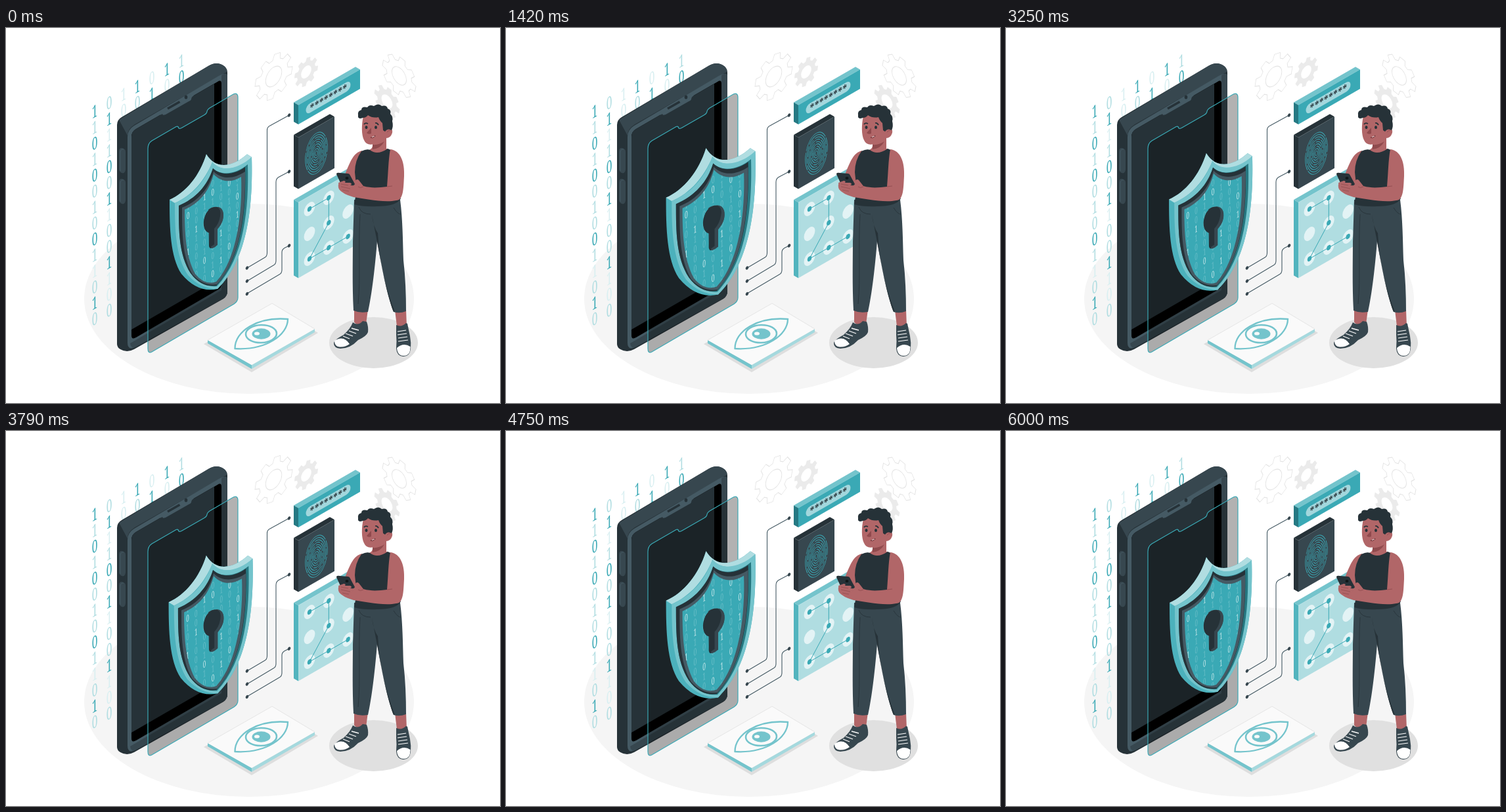
Animation of 752 by 572 pixels, one loop 6040 ms. Source, as an HTML page with a canvas:

```html
<!DOCTYPE html>
<html lang="en">
<head>
<meta charset="utf-8">
<title>Mobile security</title>
<style>
html, body { margin: 0; width: 752px; height: 572px; overflow: hidden; background: #fff; }
canvas { display: block; }
</style>
</head>
<body>
<canvas id="stage" width="752" height="572"></canvas>
<script>
const LOOP = 6040;
const stage = document.getElementById('stage');
const backdrop = document.createElement('canvas');
backdrop.width = 752;
backdrop.height = 572;
let ctx = backdrop.getContext('2d');

const TEAL = '#3aa9b5', MID = '#74c4cc', PALE = '#b0dde1';
const INK = '#263238', SLATE = '#37474f', STEEL = '#455a64', SKIN = '#b16668', SHADE = '#8f4a4d';
const ISO = 0.577;

function fill(color, d) {
  ctx.fillStyle = color;
  ctx.fill(new Path2D(d));
}

function line(color, d, width = 1) {
  ctx.strokeStyle = color;
  ctx.lineWidth = width;
  ctx.stroke(new Path2D(d));
}

function oval(color, x, y, rx, ry, tilt = 0) {
  ctx.fillStyle = color;
  ctx.beginPath();
  ctx.ellipse(x, y, rx, ry, tilt, 0, Math.PI * 2);
  ctx.fill();
}

function ring(color, x, y, rx, ry, width, tilt = 0) {
  ctx.strokeStyle = color;
  ctx.lineWidth = width;
  ctx.beginPath();
  ctx.ellipse(x, y, rx, ry, tilt, 0, Math.PI * 2);
  ctx.stroke();
}

// Runs a drawing on an upright isometric plane; dir 1 rises to the right.
function onPlane(x, y, sx, draw, dir = 1) {
  ctx.save();
  ctx.transform(sx, -sx * ISO * dir, 0, 1, x, y);
  draw();
  ctx.restore();
}

function glyph(ch, x, y, size, color, sx = 0.6, weight = '') {
  onPlane(x, y, sx, () => {
    ctx.font = `${weight} ${size}px "Noto Serif", serif`;
    ctx.textAlign = 'center';
    ctx.fillStyle = color;
    ctx.fillText(ch, 0, size * 0.357);
  });
}

function gear(x, y, r, dir, solid) {
  onPlane(x, y, 0.866, () => {
    const p = new Path2D();
    const teeth = 8;
    for (let i = 0; i < teeth; i++) {
      [[-0.34, 0.76], [-0.2, 1], [0.2, 1], [0.34, 0.76]].forEach(([a, k]) => {
        const turn = (i + a) / teeth * Math.PI * 2 + 0.2;
        p.lineTo(Math.cos(turn) * r * k, Math.sin(turn) * r * k);
      });
    }
    p.closePath();
    p.moveTo(r * 0.43, 0);
    p.arc(0, 0, r * 0.43, 0, Math.PI * 2);
    if (solid) {
      ctx.fillStyle = '#ebebeb';
      ctx.fill(p, 'evenodd');
    } else {
      ctx.strokeStyle = '#e3e3e3';
      ctx.lineWidth = 1;
      ctx.stroke(p);
    }
  }, dir);
}

// Letters a, b, c give the strength of each digit.
function digitColumn(x, y, digits, tones) {
  const colors = { a: TEAL, b: '#b0dde1', c: '#d8eff1' };
  [...digits].forEach((ch, i) => glyph(ch, x, y + i * 24.35, 26, colors[tones[i]]));
}

function drawFloor() {
  ctx.fillStyle = '#fff';
  ctx.fillRect(0, 0, 752, 572);
  oval('#f5f5f5', 370, 413, 251, 145);
  oval('#e0e0e0', 559.5, 480, 67.5, 39);
  gear(407.5, 74, 33, 1, false);
  gear(457, 67, 21, 1, true);
  gear(598.5, 73, 29.5, -1, false);
  gear(580, 112, 22.5, -1, true);
  digitColumn(135, 127, '11010010011010', 'abababbbabcbab');
  digitColumn(157, 114, '01110011001100', 'bacbabacbbaccb');
  digitColumn(179, 101, '10', 'cc');
  digitColumn(200, 89, '10', 'ab');
  digitColumn(222, 76, '01', 'ca');
  digitColumn(245, 63, '10', 'ac');
  digitColumn(267, 50, '10', 'ba');
}

function drawPhone() {
  fill(INK, 'M169 148Q169 140 176 136L308 58Q321 50 332 58Q337 62 337 68V402Q337 409 331 413L195 490Q184 496 174 490Q169 487 169 482Z');
  fill(SLATE, 'M172 140L308 58Q321 50 332 58Q337 62 336 67L196 147Q185 154 185 164Z');
  fill(STEEL, 'M185 166Q185 155 195 149L324 73Q337 66 337 74V402Q337 408 331 412L196 487Q185 492 185 480Z');
  fill(SLATE, 'M328 72Q337 67 337 75V402Q337 408 331 412L196 487Q190 489 189 481L328 400Z');
  fill('#000', 'M191 166Q191 158 198 154L322 82Q328 78 328 85V391Q328 396 323 399L198 472Q191 476 191 469Z');
  fill(INK, 'M191 166Q191 158 198 154L317 85V387L191 460Z');
  fill(STEEL, 'M235 133L238 126L283 100L286 103Q282 105 282 109Q281 111 278 112L243 132Q238 134 238 131Z');
  line(INK, 'M246 123L264.500 112.500', 3.5);
  oval(INK, 274, 105.500, 2.300, 3);
  for (const y of [202, 249]) {
    fill(SLATE, `M172 ${y - 15}Q173 ${y - 21} 179 ${y - 18}Q182 ${y - 17} 182 ${y - 13}V${y + 14}Q181 ${y + 21} 176 ${y + 19}Q172 ${y + 17} 172 ${y + 13}Z`);
    line(STEEL, `M174 ${y + 16}V${y - 13}Q175 ${y - 18} 179 ${y - 17}`, 1);
  }
  const glass = 'M216 184Q216 176 222 172L259 150.500Q262 149 263 153Q265 154 268 152L302 132.500Q306 130 306 127Q307 124 310 122L346 101Q353 98 353 106V411Q353 417 347 421L222 494Q216 497 216 489Z';
  fill('rgba(0,0,0,.3)', glass);
  line(TEAL, glass, 1.2);
}

function drawWires() {
  line(STEEL, 'M431 133L402 149Q397.500 151 397.500 156V343Q397.500 348 394 350L367 366', 1.1);
  line(STEEL, 'M431 219L415 227.500Q411 230 411 235V355Q411 360 407 362L367 386', 1.1);
  line(STEEL, 'M431 332L424 335.500Q420 338 420 342V369Q420 374 416 376L367 405', 1.1);
  for (const y of [133, 219, 332]) oval(SLATE, 431, y, 2, 2.8, 0.5);
  for (const y of [366, 386, 405.5]) oval(SLATE, 367, y, 2, 2.8, 0.5);
}

// Upright slab with its front face at x = 445.
function slab(top, width, height, front, side, lid) {
  const rise = width * ISO;
  fill(lid, `M438 ${top - 4}l${width} ${-rise}l7 4l${-width} ${rise}Z`);
  fill(side, `M438 ${top - 4}l7 4v${height}l-7 -4Z`);
  fill(front, `M445 ${top}l${width} ${-rise}v${height}l${-width} ${rise}Z`);
}

function drawCards() {
  slab(117.5, 94, 29.5, TEAL, '#267983', MID);
  ctx.lineCap = 'round';
  onPlane(490.5, 106, 0.866, () => line('#a3d7dd', 'M-32 0H32', 14.5));
  ctx.lineCap = 'butt';
  for (let i = 0; i < 8; i++) glyph('*', 466 + i * 7.1, 121.5 - i * 4.1, 16, INK, 0.8, 'bold');

  slab(167, 55, 78.5, SLATE, INK, INK);
  onPlane(472.5, 191, 0.866, () => {
    for (let i = 1; i <= 9; i++) {
      ctx.setLineDash(i < 3 ? [] : [13 + i * 4, 2, 10 + i * 2, 2.5]);
      ctx.lineDashOffset = i * 17;
      ring(TEAL, 0, 0, i * 2.15, i * 3.4, 0.9);
    }
    ctx.setLineDash([]);
  });

  slab(266, 94, 115.5, PALE, '#52b4be', MID);
  const spots = [];
  for (let c = 0; c < 3; c++) {
    for (let r = 0; r < 3; r++) {
      const x = 462 + c * 29.3, y = 276 - c * 17 + r * 38;
      spots.push([x, y]);
      onPlane(x, y, 0.866, () => oval('#e3f3f5', 0, 0, 9.7, 9.7));
    }
  }
  const route = [0, 3, 4, 6 - 0, 5, 8].map(i => spots[i]);
  route[3] = spots[2];
  line(TEAL, 'M' + route.map(p => p.join(' ')).join('L'), 1);
  for (const [x, y] of route) onPlane(x, y, 0.866, () => oval(TEAL, 0, 0, 3.7, 3.7));

  fill('#dedede', 'M301 482L405 423L475 465L374 525Z');
  fill(MID, 'M307 476L374 514V520L307 481Z');
  fill('#a5d9de', 'M374 514L470 459V464L374 520Z');
  fill('#fafafa', 'M307 476L405 420L470 459L374 514Z');
  line('#e0e0e0', 'M307 476L405 420L470 459', 0.8);
  line(MID, 'M348.500 489C348 463 382 440 429 444C429 468 396 492 348.500 489Z', 2.3);
  ring(MID, 388.5, 466.5, 23.5, 13.5, 2.6, -0.03);
  oval(MID, 388.5, 466.5, 14, 8.2);
  oval('#fafafa', 382, 466, 4, 2.6);
}

function drawPerson() {
  fill(SKIN, 'M530 429H551L548 452Q538 456 530 449ZM592 430H609L610 455Q602 460 595 455Z');
  fill(SLATE, 'M528 449Q536 455 543 447L549 448Q552 456 551 464Q549 470 536 476Q524 489 509 489Q499 488 499 481Q499 476 514 468Q524 459 528 449Z');
  fill('#fff', 'M500 477Q514 468 523 482Q516 487 508 486.500Q500 486 500 477Z');
  line('#fff', 'M513 470L523 474M517 466L528 470M522 462L533 466M526 458L537 461', 1.3);
  fill(SLATE, 'M594 453Q602 457 609 450L611 451L615 470Q617 480 616 490Q614 502 604 501Q595 500 594 489Q595 478 594 468Z');
  fill('#fff', 'M595 488Q605 479 615.500 486Q616 500 605 500Q596 500 595 488Z');
  line('#fff', 'M596 463L609 461M596 468L610 466M597 473L611 471M597 478L612 476', 1.2);

  fill(SLATE, 'M530 262H600C604 292 604 325 605 354C608 380 609 407 609 432Q599 436 590 433C580 407 572 365 565 325C562 362 557 407 551 433Q538 435 529 431C527 391 528 356 528 326Z');
  fill(INK, 'M565 326L557 285Q559 303 566 313C568 353 577 395 592 433H590C580 407 572 365 565 326Z');
  line(INK, 'M537 273Q541 284 555 284M539 284C536 335 540 380 536 421M590 274Q596 284 601 284', 0.8);

  fill(SKIN, 'M542 187C529 190 524 204 517 221L514 235L530 242L538 218Z');
  fill(SKIN, 'M558 171L579 166L579 184Q586 186 589 189L570 203L543 188Q557 187 558 180Z');
  fill(SHADE, 'M558 178Q567 179 576 173Q570 184 558 185Z');
  fill(INK, 'M541 188Q549 184 554 186Q565 195 581 184L588 187Q580 211 585 242L601 260Q595 272 565 272Q544 273 530 269Q535 248 531 220Q531 202 541 188Z');
  fill(SKIN, 'M585 185C601 187 607 205 606 226C605 245 605 263 594 263C575 267 546 260 529 258Q512 253 507 246Q504 239 508 236L530 236Q533 229 537 232L544 241C558 245 569 243 580 242C582 219 582 201 585 185Z');
  line(SHADE, 'M580 242L588 241M544 242Q539 245 536 242', 0.8);
  fill(INK, 'M503 223Q503 220 508 221L520 222Q523 222 524 225L531 238Q530 241 526 240L515 240Q511 240 509 236Z');
  oval('#101719', 519, 229, 2.5, 2);
  fill(SKIN, 'M506 236L514 233Q518 233 516 236L524 236Q528 238 524 240L528 243Q528 247 523 247L526 252L515 250L507 244Z');
  line(SHADE, 'M510 238L521 240M510 242L524 245M512 247L522 249', 0.7);

  fill(SKIN, 'M544 134C541 148 541 163 545 171Q549 180 560 177Q572 175 577 168Q585 169 588 160Q589 151 581 152L578 134L560 128Z');
  fill(INK, 'M543 137Q535 140 536 133Q535 126 541 125Q541 119 550 121Q553 116 560 119Q567 114 572 119Q580 117 581 123Q587 125 585 131Q590 136 588 142Q590 150 587 156Q581 152 577 158L574 156L573 145Q569 142 567 136Q558 138 551 133Q548 137 543 137Z');
  oval(INK, 548.5, 151.5, 2, 2.5);
  oval(INK, 563, 151.5, 2, 2.5);
  line(INK, 'M545 147Q547 144 551 146M562 145Q565 144 567 148', 1.7);
  fill(SHADE, 'M556 152L549 160Q552 163 556 161Z');
  line('#6e3034', 'M555 167Q559 168 562 164', 1.3);
  line('#fff', 'M557 166.500L561 165', 0.8);
  line(SHADE, 'M580 159Q582 156 585 156', 0.8);
}

const FACE = 'M272 277C294 267 309 250 316 223C328 236 344 236 358 227C360 280 352 352 320 387Q302 393 288 375C273 347 272 310 272 277Z';
const BRIGHT = ['2,-1', '3,-1', '5,-1', '6,1', '0,0', '1,2', '6,3', '4,4', '5,6', '0,4', '2,6', '4,7', '3,8'];
const LIT_ONES = ['2,-1', '1,2', '6,3', '4,4', '0,4', '4,7'];

function drawShieldDigits() {
  ctx.save();
  ctx.clip(new Path2D(FACE));
  for (let c = 0; c < 7; c++) {
    for (let r = -2; r < 10; r++) {
      const key = c + ',' + r;
      const lit = BRIGHT.includes(key);
      const one = lit ? LIT_ONES.includes(key) : (c * 5 + r * r + c * r + 20) % 7 < 3;
      glyph(one ? '1' : '0', 277.3 + c * 12.5, 286 - c * 7.2 + r * 13.8, 14, lit ? '#c8e8eb' : '#68bdc7', 0.56);
    }
  }
  ctx.restore();
}

function drawShield() {
  fill('#4cb1bc', 'M249 262C274 251 295 225 305 192.500C319 216 344 213 367 192.500L374 197C376 268 369 352 322 398Q292 405 267 375C250 349 249 305 249 262Z');
  fill(PALE, 'M249 262C274 251 295 225 305 192.500L314 205C302 233 284 255 257 267ZM305 192.500C319 216 344 213 367 192.500L374 197C355 216 329 221 314 205Z');
  fill(MID, 'M257 267C285 255 304 233 314 204C327 221 354 215 374 197C376 268 369 352 322 398Q296 398 277 377C258 349 257 305 257 267Z');
  fill('#257780', 'M263 271C289 260 307 240 315 214C329 227 351 222 368 208C370 274 363 350 321 394Q297 396 281 374C263 346 263 309 263 271Z');
  fill(INK, 'M263 271C289 260 307 240 315 214C329 227 349 223 364 212C366 276 359 351 320 393Q297 396 281 374C263 346 263 309 263 271Z');
  fill(STEEL, 'M268 274C291 265 309 246 316 219C329 232 348 230 364 219C365 279 357 353 321 391Q300 394 284 376C268 348 268 312 268 274Z');
  fill(TEAL, FACE);
  drawShieldDigits();
  fill(SLATE, 'M308 277C316 270 332 271 331 286C331 295 326 302 322 307V331L313 336L309 333Z');
  oval(INK, 314, 293, 12.5, 20, 0.28);
  fill(INK, 'M310 303L321 303V326Q319 334 311 336Q309 335 309 331Z');
  oval(SLATE, 319, 290.5, 11, 18, 0.3);
  fill(SLATE, 'M313 306L322 303V330Q318 336 312 336Z');
  fill(INK, 'M304 284Q310 273 321 273Q328 276 326 287Q324 299 317 306V330L310 335V311Q300 305 304 284Z');
}

// Times in ms and how far the shield has grown.
const PULSE = [[0, 0], [630, 0.65], [1150, 0.97], [1350, 1], [3500, 0.05], [4250, 0.57], [4800, 1], [5000, 0.93], [6000, 0], [LOOP, 0]];

function pulseAt(t) {
  const i = PULSE.findIndex(k => k[0] > t);
  const [t0, a] = PULSE[i - 1], [t1, b] = PULSE[i];
  return a + (b - a) * (t - t0) / (t1 - t0);
}

drawFloor();
drawPhone();
drawWires();
drawCards();
drawPerson();
ctx = stage.getContext('2d');

const start = performance.now();
function render() {
  const t = (performance.now() - start) % LOOP;
  const scale = 1 + 0.09 * pulseAt(t);
  ctx.drawImage(backdrop, 0, 0);
  ctx.save();
  ctx.translate(311, 300);
  ctx.scale(scale, scale);
  ctx.translate(-311, -300);
  drawShield();
  ctx.restore();
  requestAnimationFrame(render);
}
render();
</script>
</body>
</html>
```
